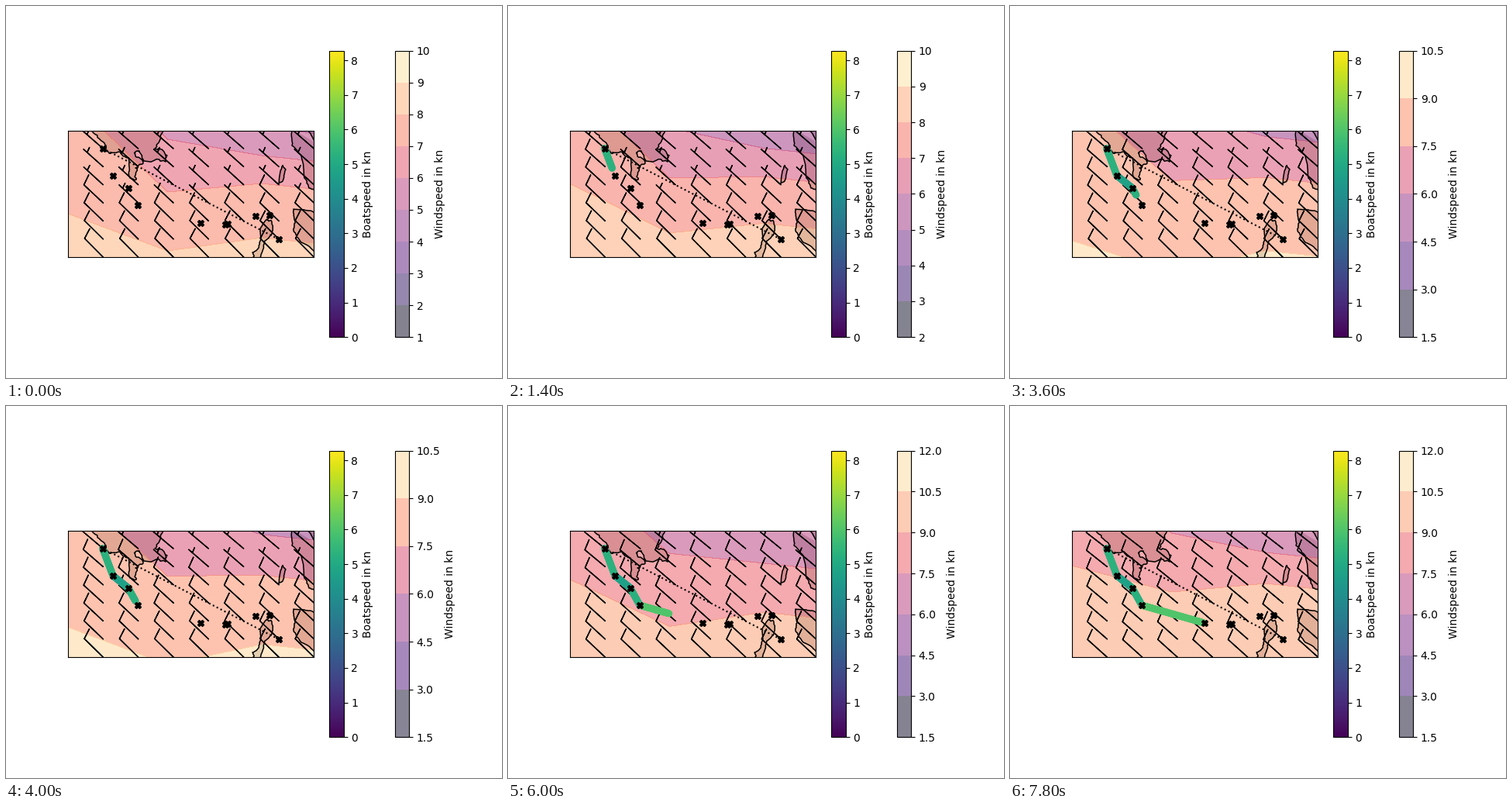
A matplotlib script for the animation above (8000 ms loop, 640 px wide and 480 px high).

```python
import numpy as np
import matplotlib.pyplot as plt
from matplotlib.animation import FuncAnimation
from matplotlib.collections import LineCollection
from matplotlib.colors import BoundaryNorm, ListedColormap, Normalize

W, H, FRAMES = 640, 480, 40
LEFT, RIGHT, TOP, BOTTOM = 80, 397.44, 160.7, 324.1

# Height of each wind speed level at the grid columns, first and last frame.
LEVELS = [6, 7, 7.5, 8, 9]
COLS = [80, 208.5, 330, 451.5]
FIRST = np.array([(42, 172, 193), (116, 240, 229), (205, 278, 249),
                  (268, 316, 299), (540, 432, 390)])
LAST = np.array([(20, 90, 140), (64, 139, 180), (72, 164, 189),
                 (149, 187, 195), (206, 240, 229)])

# Colour scales: first frame, lowest and highest level, step.
SCALES = [(0, 1, 10, 1), (4, 2, 10, 1), (10, 1.5, 10.5, 1.5),
          (21, 1.5, 12, 1.5)]

WAY = np.array([(125, 184), (138.5, 219.5), (158, 235), (170.5, 257.5),
                (251.5, 280.5), (283, 282.5), (286, 281), (322.5, 271.5),
                (340.5, 270), (352.5, 301.5)]) - 0.4
DIST = np.r_[0, np.cumsum(np.hypot(*np.diff(WAY, axis=0).T))]
LEG_SPEED = np.array([5.3, 4.75, 5.25, 6])

# Coasts: roughness and a few corner points.
COASTS = [
    (1.6, [(109, 158), (120, 171), (129, 181), (133, 190), (147, 188),
           (158, 196), (160, 222), (168, 224), (169, 209), (177, 203),
           (166, 190), (172, 187), (178, 200), (206, 201), (208, 193),
           (192, 184), (199, 172), (205, 158)]),
    (0.8, [(368, 158), (369, 180), (381, 193), (385, 222), (391, 235),
           (400, 238), (400, 158), (386, 158), (399, 176)]),
    (0.4, [(357, 206), (361, 211), (357, 226), (352, 229), (354, 213),
           (357, 206)]),
    (0.8, [(400, 266), (385, 263), (371, 262), (373, 280), (371, 290),
           (381, 305), (400, 319)]),
    (0.9, [(320, 327), (318, 318), (326, 312), (329, 300), (328, 288),
           (337, 275), (343, 279), (342, 296), (334, 303), (327, 327)]),
]

rng = np.random.default_rng(4)


def rough(points, amp, passes=3):
    """Split every side in two and shift the midpoints, a few times over."""
    pts = np.array(points, float)
    for _ in range(passes):
        mid = (pts[1:] + pts[:-1]) / 2 + rng.normal(0, amp, (len(pts) - 1, 2))
        out = np.empty((2 * len(pts) - 1, 2))
        out[::2], out[1::2] = pts, mid
        pts, amp = out, amp * 0.6
    return pts


def wind_at(t):
    """Speed levels and their heights; the west column slows down."""
    p = t / (FRAMES - 1)
    ease = np.array([1 - (1 - p) ** 2, p, p])
    rows = FIRST + (LAST - FIRST) * ease
    rows = np.c_[rows, rows[:, -1] + 13]
    return [5, *LEVELS], np.vstack([2 * rows[0] - rows[1], rows])


def add_cax(x):
    return fig.add_axes([x / W, 0.11, 18.48 / W, 0.77])


fig = plt.figure(figsize=(W / 100, H / 100), dpi=100)
ax = fig.add_axes([LEFT / W, 1 - BOTTOM / H, (RIGHT - LEFT) / W,
                   (BOTTOM - TOP) / H])
ax.set(xlim=(LEFT, RIGHT), ylim=(BOTTOM, TOP), xticks=[], yticks=[])
ax.set_autoscale_on(False)

for amp, corners in COASTS:
    coast = rough(corners, amp)
    ax.fill(*coast.T, fc="#c8c8c8", lw=0, zorder=0.5)
    ax.plot(*coast.T, "k", lw=1.1, zorder=2)

ax.plot(*WAY[[0, -1]].T, "k:", lw=1.5, zorder=3)
ax.plot(*WAY.T, "kX", ms=6, zorder=5)

boat = plt.cm.ScalarMappable(Normalize(0, 8.28), "viridis")
fig.colorbar(boat, cax=add_cax(417.28), label="Boatspeed in kn")

bars = []
for start, low, high, step in SCALES:
    scale = np.arange(low, high + step / 2, step)
    mids = (scale[1:] + scale[:-1]) / 2
    colors = plt.cm.magma((mids - low) / (high - low), alpha=0.5)
    cax = add_cax(501.6)
    wind = plt.cm.ScalarMappable(BoundaryNorm(scale, len(mids)),
                                 ListedColormap(colors))
    fig.colorbar(wind, cax=cax, ticks=scale, label="Windspeed in kn",
                 format="%.1f" if step % 1 else "%d")
    bars.append((start, list(scale), colors, cax))

GX, GY = np.meshgrid(np.linspace(LEFT, RIGHT, 8), np.linspace(BOTTOM, TOP, 8))
moving = []


def draw_bands(values, heights, scale, colors):
    shown = [i for i, v in enumerate(values) if v in scale]
    edges = [np.full(4, -900), *heights[shown], np.full(4, 900)]
    below = scale.index(values[shown[0]]) - 1
    for color, upper, lower in zip(colors[below:], edges, edges[1:]):
        moving.append(ax.fill_between(COLS, upper, lower, fc=color, lw=0,
                                      antialiased=False, zorder=1))


def draw_barbs(t, values, heights):
    speed = np.empty_like(GX)
    for k, x in enumerate(GX[0]):
        ys = [np.interp(x, COLS, row) for row in heights]
        speed[:, k] = np.interp(GY[:, k], ys, values)
    rise = (BOTTOM - GY) / (BOTTOM - TOP)
    angle = np.radians(45.3 - 5 * rise - 3.5 * (t / FRAMES) ** 2)
    moving.append(ax.barbs(GX, GY, speed * np.cos(angle),
                           -speed * np.sin(angle), zorder=3))


def draw_track(t):
    if t == 0:
        return
    s = np.linspace(0, 3.85 * t + 0.0137 * t ** 2, 6 * t)
    pts = np.c_[np.interp(s, DIST, WAY[:, 0]), np.interp(s, DIST, WAY[:, 1])]
    leg = np.searchsorted(DIST, s[:-1], side="right") - 1
    track = LineCollection(np.stack([pts[:-1], pts[1:]], 1), lw=6.5, zorder=4,
                           colors=boat.to_rgba(LEG_SPEED[leg]),
                           capstyle="round")
    moving.append(ax.add_collection(track, autolim=False))


def update(t):
    while moving:
        moving.pop().remove()
    active = [b for b in bars if b[0] <= t][-1]
    for bar in bars:
        bar[3].set_visible(bar is active)
    values, heights = wind_at(t)
    draw_bands(values, heights, active[1], active[2])
    draw_barbs(t, values, heights)
    draw_track(t)
    return moving


anim = FuncAnimation(fig, update, frames=FRAMES, interval=200, repeat=True,
                     init_func=lambda: update(0), blit=False)
plt.show()
```
